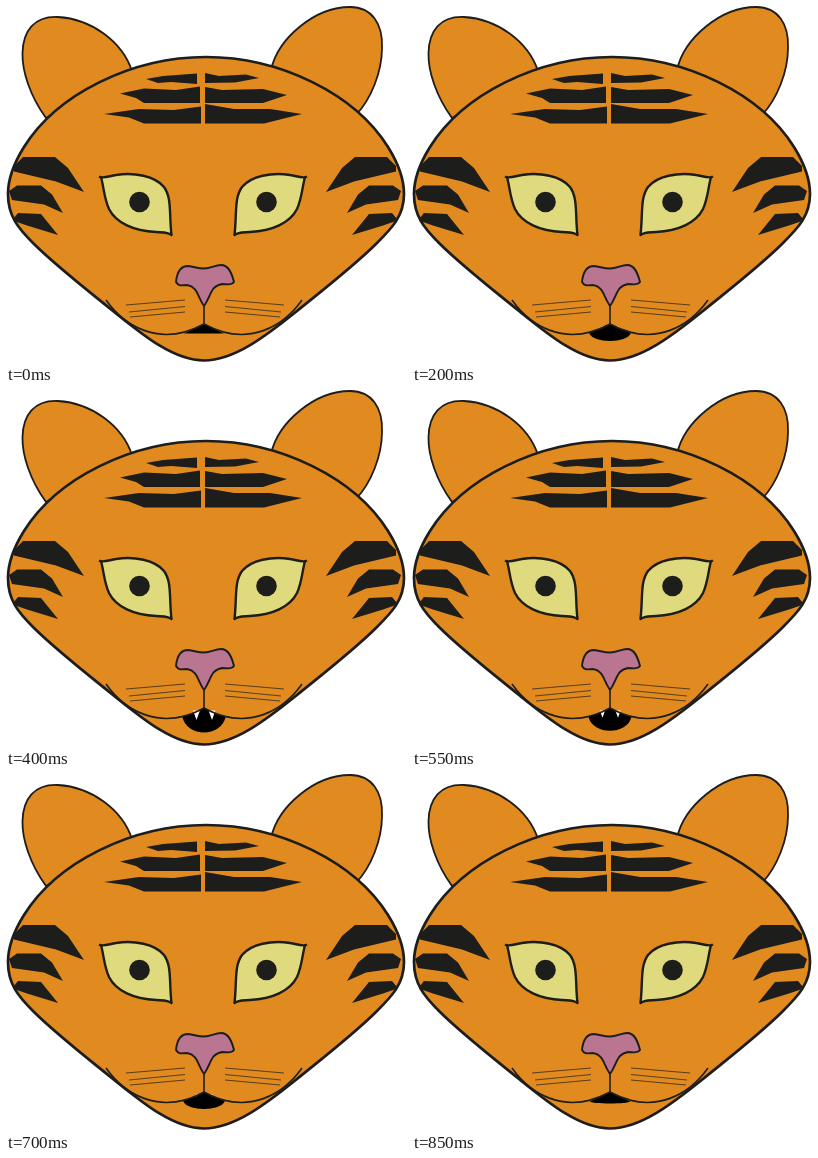
Write an HTML page that moves like this. It is 400x356 px and loops after 0.9 s.

```html
<!DOCTYPE html>
<html lang="en">
<head>
<meta charset="utf-8">
<title>Tiger</title>
<style>
html, body { margin: 0; width: 100%; height: 100%; overflow: hidden; background: #fff; }
svg { display: block; width: 100vw; height: 100vh; }
.line { fill: none; stroke: #1d1d1b; }
.fur { fill: #e08a1f; stroke: #1d1d1b; }
.dark { fill: #1d1d1b; }
</style>
</head>
<body>
<svg viewBox="0 0 400 356">
  <g class="fur" stroke-width="1.8">
    <path d="M40 112C24 90 16 65 16.500 47C17 25 28 10 52 11C85 13 116 35 126 65Z"/>
    <path d="M265 64C272 32 309 1 344 1C366 1 377 18 376 42C376 66 365 93 350 109Z"/>
  </g>
  <path class="fur" stroke-width="2.7" d="M200 51C126 51 51 88 18 141C8 157 2 171 2 188C2 210 12 222 27 237C50 260 85 287 107 305C138 330 168 354.500 198 354.500C228 354.500 260 330 291 305C313 287 348 260 371 237C386 222 398 210 398 188C398 171 392 157 382 141C349 88 274 51 200 51Z"/>

  <g class="dark">
    <path d="M140 73L157 70L191 67.500V78L165 76L152 77ZM114 87.500L138 82.500L170 84L194 80.500V97H138L130 92ZM98 108L133 103L168 104L195 100.500V117.500H138L123 111.500Z"/>
    <path d="M199 67L213 70L240 68.500L253 72L229 76.500L199 77ZM199 81L216 84L257 83L281 89L257 97H199ZM199 98L228 103L264 103L296 108L258 117.500H199Z"/>
    <path id="stripes" d="M8 160L17 151H49L62 162L78 186L50 175.500L8 165.500ZM3 185L11 179.500H35L46 188.500L57 207L38 198.500L6 194ZM7 213L12 207L35 208L52 229L21 219.500L8 215Z"/>
    <use href="#stripes" transform="matrix(-1 0 0 1 398 0)"/>
  </g>

  <g id="eye">
    <path d="M93 170.500C97 173 103 170 110 169C128 166 149 170 158 181C166 192 163 208 165.500 229C162 226 157 226.500 150 226C128 225 110 217 103 203C98 192 98 182 95 171" fill="#e0da7e" stroke="#1d1d1b" stroke-width="2.400" stroke-linejoin="round"/>
    <circle class="dark" cx="133.500" cy="196" r="10.300"/>
  </g>
  <use href="#eye" transform="matrix(-1 0 0 1 394 0)"/>

  <path id="mouth"/>
  <path id="teeth" fill="#fff"/>

  <g class="line" stroke-width="1.600">
    <path d="M198 298V318"/>
    <path id="lip" d="M100 294C117 318 152 343 198 318"/>
    <use href="#lip" transform="matrix(-1 0 0 1 396 0)"/>
  </g>
  <g class="line" stroke-width=".7">
    <path id="whiskers" d="M120 299L179 294M123 306L179 300.500M124 311L179 306"/>
    <use href="#whiskers" transform="matrix(-1 0 0 1 398 0)"/>
  </g>
  <path fill="#ba7591" stroke="#1d1d1b" stroke-width="1.900" stroke-linejoin="round" d="M170 276C171 266 174 260 182 260C189 261 192 262.500 198 262.500C205 262.500 209 259 215 259C223 259 226 268 228 276C225 280 221 278 216 278C204 280 205 291 198 300C191 290 192 281 181 279C176 279 173 281 170 276Z"/>
</svg>
<script>
const LOOP = 900, STEP = 50;
const mouth = document.getElementById('mouth');
const teeth = document.getElementById('teeth');

const fang = (x, len) =>
  `M${x - len * 0.36} 320.5L${x} ${320.5 + len}L${x + len * 0.36} 320.5Z`;

function draw(ms) {
  const t = Math.floor((ms % LOOP) / STEP) * STEP;
  const open = 1 - Math.abs(t / (LOOP / 2) - 1);
  const side = 327.5 - open;
  const low = side + open * 24;
  const half = 20 + open * 2;
  mouth.setAttribute('d',
    `M198 318Q188 323 ${198 - half} ${side}` +
    `C${180 + open} ${low} ${216 - open} ${low} ${198 + half} ${side}Q208 323 198 318Z`);
  const len = open * open * 12;
  teeth.setAttribute('d', fang(190.5, len) + fang(206, len));
}

function tick(now) {
  draw(now);
  requestAnimationFrame(tick);
}
draw(0);
requestAnimationFrame(tick);
</script>
</body>
</html>
```
